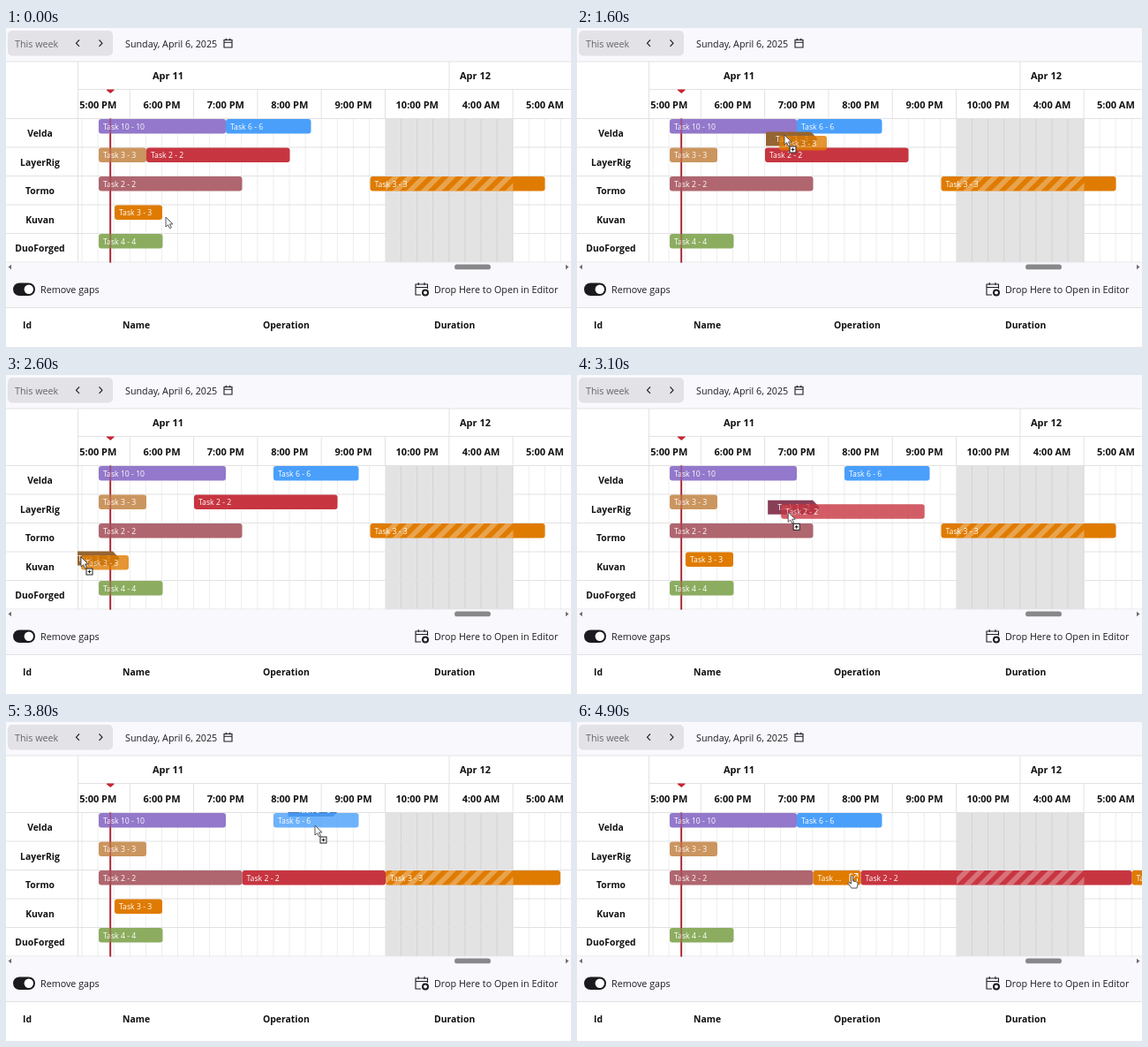
Recreate the animation shown at these times as an HTML page. Size 640 by 361 pixels, loop 5 s.

```html
<!DOCTYPE html>
<html lang="en">
<head>
<meta charset="utf-8">
<title>Scheduler</title>
<style>
  html, body { margin: 0; width: 100%; height: 100%; overflow: hidden; background: #fff; }
  svg { display: block; width: 100vw; height: 100vh; font: 10.75px "Open Sans", "Noto Sans", sans-serif; fill: #1c1c20; }
  .bold { font-weight: 700; font-size: 10.4px; fill: #111; }
  .date { font-size: 11px; }
  .mid { text-anchor: middle; }
  .task { font-size: 8.7px; font-weight: 500; fill: #fff; }
  .line { fill: none; stroke: #1c1c20; stroke-width: 1.1; }
  .now { stroke: #a92731; stroke-width: 1.8; }
</style>
</head>
<body>
<svg viewBox="0 0 640 361">
  <defs>
    <pattern id="stripes" width="11.3" height="11.3" patternUnits="userSpaceOnUse"
      patternTransform="translate(430 168) rotate(45)">
      <rect x="5.6" width="5.7" height="11.3" fill="#fff" fill-opacity=".3"/>
    </pattern>
    <clipPath id="chart"><rect x="81" y="102" width="559" height="164"/></clipPath>
  </defs>
  <g id="frame"></g>
  <g id="live"></g>
</svg>
<script>
const LOOP = 5000, STEP = 100;
const CELL = 72.3, ROW = 32.5, TOP = 102.5, BAR = 16.5;
const OFF_FROM = 430, OFF_TO = 574.5; // closed hours

const rect = (x, y, w, h, fill, more = '') =>
  `<rect x="${x}" y="${y}" width="${w}" height="${h}" fill="${fill}" ${more}/>`;
const text = (x, y, s, cls = '', more = '') => `<text x="${x}" y="${y}" class="${cls}" ${more}>${s}</text>`;
const path = (d, more = 'class="line"') => `<path d="${d}" ${more}/>`;
const rowY = row => TOP + .5 + row * ROW;
const range = n => [...Array(n).keys()];

function toolbar() {
  return rect(0, 0, 640, 38, '#f9f8fc') + rect(2, 3, 119, 28.5, '#e3e2e6', 'rx="5"')
    + text(10, 21.5, 'This week', '', 'fill="#65656a"')
    + path('M83 13.5l-3.5 3.7 3.5 3.7M105.5 13.5l3.5 3.7-3.5 3.7')
    + text(135, 21.5, 'Sunday, April 6, 2025')
    + path('M247 13.5h9v8.5h-9zM247 16.2h9M249.3 11.8v2.5M253.7 11.8v2.5');
}

function grid() {
  const minor = range(31).map(i => `M${86 + i * CELL / 4} ${TOP}V265.5`).join('');
  const hours = range(7).map(i => `M${140.3 + i * CELL} 69.5V102`).join('');
  const rows = range(6).map(i => `M0 ${TOP + i * ROW}H640`).join('');
  let s = rect(OFF_FROM, TOP, OFF_TO - OFF_FROM, 163, '#e3e3e4')
    + path(minor, 'stroke="#000" stroke-opacity=".075"')
    + path('M0 38H640M81 69.5H640M81.5 38V265.5M502 38V69.5' + hours + rows, 'stroke="#e2e2e4"')
    + text(183.5, 58, 'Apr 11', 'bold date mid') + text(514, 58, 'Apr 12', 'bold date');
  ['5:00 PM', '6:00 PM', '7:00 PM', '8:00 PM', '9:00 PM', '10:00 PM', '4:00 AM', '5:00 AM']
    .forEach((h, i) => s += text(104.3 + i * CELL, 90.5, h, 'bold date mid'));
  ['Velda', 'LayerRig', 'Tormo', 'Kuvan', 'DuoForged']
    .forEach((name, i) => s += text(38.5, 123 + i * ROW, name, 'bold mid'));
  return s + path('M114 69.5h8.5v1l-4.2 3.5-4.3-3.5z', 'fill="#c62430"');
}

function footer() {
  let s = rect(0, 265.5, 640, 51, '#f9f8fc') + path('M0 316.5H640', 'stroke="#e2e2e4"')
    + path('M2.5 270.5l3.5-2.7v5.4zM637.5 270.5l-3.5-2.7v5.4z', 'fill="#6d6d70"')
    + rect(508, 267.5, 41, 5.8, '#88888b', 'rx="2.9"')
    + rect(8, 288.5, 25, 14.5, '#1b1b1f', 'rx="7.25"') + '<circle cx="25.8" cy="295.7" r="5.2" fill="#fff"/>'
    + text(39, 299.5, 'Remove gaps')
    + path('M470 302h-6v-12h13.5v5M464 293.5h13.5M467.2 288v3M474 288v3')
    + '<circle cx="475" cy="299.5" r="3" class="line" style="stroke-width:2"/>'
    + text(485, 299.5, 'Drop Here to Open in Editor');
  [[19, 'Id'], [132, 'Name'], [291, 'Operation'], [485, 'Duration']]
    .forEach(([x, name]) => s += text(x, 340, name, 'bold'));
  return s;
}

const task = (name, color, x, row, work) => ({ name, color, x, row, work });
const tasks = {
  ten: task('Task 10 - 10', '#9378cb', 105, 0, 144),
  tan: task('Task 3 - 3', '#cb955f', 105, 1, 54),
  rose: task('Task 2 - 2', '#af666f', 105, 2, 162.5),
  green: task('Task 4 - 4', '#8cad60', 105, 4, 72.5),
  long: task('Task 3 - 3', '#df7b00', 412.5, 2, 53.5),
  red: task('Task 2 - 2', '#c73540', 159, 1, 162.5),
  blue: task('Task 6 - 6', '#4a9ffb', 249, 0, 96.5),
  small: task('Task 3 - 3', '#df7b00', 123, 3, 54)
};

// grab: pointer inside the bar; via: [time, x, y] of the bar on its way
const drags = [
  { id: 'small', start: 200, end: 600, x: 267.5, row: 2, grab: [8, 8] },
  { id: 'small', start: 700, end: 1300, x: 159, row: 1, grab: [-1.5, -1], via: [900, 263.5, 161] },
  { id: 'small', start: 1400, end: 1800, x: 249, row: 0, grab: [6, -1], via: [1600, 229, 122] },
  { id: 'small', start: 2200, end: 2700, x: 123, row: 3, grab: [0, 2], via: [2600, 85, 204] },
  { id: 'red', start: 3000, end: 3300, x: 267.5, row: 2, grab: [8, 9] },
  { id: 'blue', start: 3800, end: 4000, x: 249, row: 0, grab: [47, 14], hover: true },
  { id: 'small', start: 4500, end: 4900, x: 267.5, row: 2, grab: [44, 6], hover: true }
];

// Work pauses during closed hours, so a bar that meets them grows.
const width = ({ x, work }) => work + (x < OFF_TO && x + work > OFF_FROM ? OFF_TO - OFF_FROM : 0);

// A dropped task pushes the later ones in its row to the right.
function drop(plan, { id, x, row }) {
  const moved = Object.assign(plan[id], { x, row });
  let edge = x + width(moved);
  Object.values(plan)
    .filter(o => o !== moved && o.row === row && o.x >= x)
    .sort((a, b) => a.x - b.x)
    .forEach(o => {
      o.x = Math.max(o.x, edge);
      edge = o.x + width(o);
    });
}

function planAt(t) {
  const plan = structuredClone(tasks);
  drags.filter(d => d.end <= t).forEach(d => drop(plan, d));
  return plan;
}

const ease = p => p < .5 ? 4 * p ** 3 : 1 - 4 * (1 - p) ** 3;

function between(a, b, t, curve = p => p) {
  const p = curve((t - a[0]) / (b[0] - a[0]));
  return [a[1] + (b[1] - a[1]) * p, a[2] + (b[2] - a[2]) * p];
}

const dropKey = d => [d.end, d.x, rowY(d.row)];
const pickKey = d => {
  const { x, row } = planAt(d.start)[d.id];
  return [d.start, x, rowY(row)];
};
const pointerAt = ([t, x, y], { grab }) => [t, x + grab[0], y + grab[1]];

function carry(d, t) {
  const keys = [pickKey(d), ...(d.via ? [d.via] : []), dropKey(d)];
  const i = d.via && t >= d.via[0] ? 1 : 0;
  const [x, y] = between(keys[i], keys[i + 1], t);
  return { x, y, left: keys[i + 1][1] < keys[i][1] };
}

function travel(last, next, t) {
  const from = last ? pointerAt(dropKey(last), last) : [0, 181, 214];
  return next ? between(from, pointerAt(pickKey(next), next), t, ease) : from.slice(1);
}

const openIcon = (x, y) => path(`M${x + 4} ${y + .5}h-3.5v8.500h8.500v-3.500M${x + 5.5} ${y}h4v4M${x + 9} ${y + .5}l-5 5`,
  'fill="none" stroke="#fff"');

function bar(item, hover) {
  const { x, row, color, name } = item, y = rowY(row), w = width(item);
  const from = Math.max(x, OFF_FROM), to = Math.min(x + w, OFF_TO);
  let s = rect(x, y, w, BAR, color, 'rx="3"');
  if (to > from) s += rect(from, y, to - from, BAR, 'url(#stripes)');
  s += text(x + 5, y + 11.6, hover && w < 60 ? 'Task ...' : name, 'task');
  return hover ? s + openIcon(x + Math.min(48, w - 13), y + 3.5) : s;
}

// A tag trails behind the translucent bar.
function ghost({ name, color, work }, { x, y, left }) {
  const tx = x + (left ? 16.5 : -15), ty = y + (left ? -12 : -4.5);
  return path(`M${tx} ${ty}h51l7.5 8-7.5 8h-51z`, `style="fill:color-mix(in srgb, ${color} 55%, #3a4a70)"`)
    + text(tx + 11, ty + 11.5, name, 'task')
    + `<g opacity=".8">${rect(x, y, work, BAR, color, 'rx="3"')}${text(x + 5, y + 11.6, name, 'task')}</g>`;
}

const shape = (d, x, y) => path(d, `transform="translate(${x} ${y})" fill="#fff" stroke="#44444a" stroke-width=".9"`);
const arrow = (x, y) => shape('M0 0v11l2.6-2.3 1.9 4 1.9-.9-1.9-3.900h3.500z', x, y);
const hand = (x, y) => shape('M-1 1q1-1.8 2 0v5l4.5 1q1.5 .5 1 2.5l-1 4.5h-6l-4-5.5q.5-1.5 2-.5l1.5 1z', x, y);
const dropMark = (x, y) => rect(x + 6, y + 13, 7, 7, '#fff', 'stroke="#222"')
  + path(`M${x + 7.7} ${y + 16.5}h3.6m-1.8-1.8v3.6`);

function live(t) {
  const plan = planAt(t);
  const held = drags.find(d => t >= d.start && t < d.end);
  const last = drags.findLast(d => d.end <= t);
  const next = drags.find(d => d.start > t);
  const hovered = last?.hover && t < last.end + 200 ? last.id : '';
  const nowLine = alpha => path(`M118.2 ${TOP}V265.5`, `class="now" stroke-opacity="${alpha}"`);

  let chart = nowLine(1);
  for (const id in plan) if (id !== held?.id) chart += bar(plan[id], id === hovered);
  chart += nowLine(.45);

  let x, y, pointer;
  if (held) {
    const pose = carry(held, t);
    [, x, y] = pointerAt([t, pose.x, pose.y], held);
    chart += ghost(plan[held.id], pose);
    pointer = arrow(x, y) + dropMark(x, y);
  } else {
    [x, y] = travel(last, next, t);
    pointer = next ? arrow(x, y) : hand(x, y);
  }
  return `<g clip-path="url(#chart)">${chart}</g>${pointer}`;
}

const stage = document.getElementById('live');
document.getElementById('frame').innerHTML = toolbar() + grid() + footer();
let shown = -1;
function tick(now) {
  const t = Math.floor(now % LOOP / STEP) * STEP;
  if (t !== shown) stage.innerHTML = live(shown = t);
  requestAnimationFrame(tick);
}
tick(performance.now());
</script>
</body>
</html>
```
